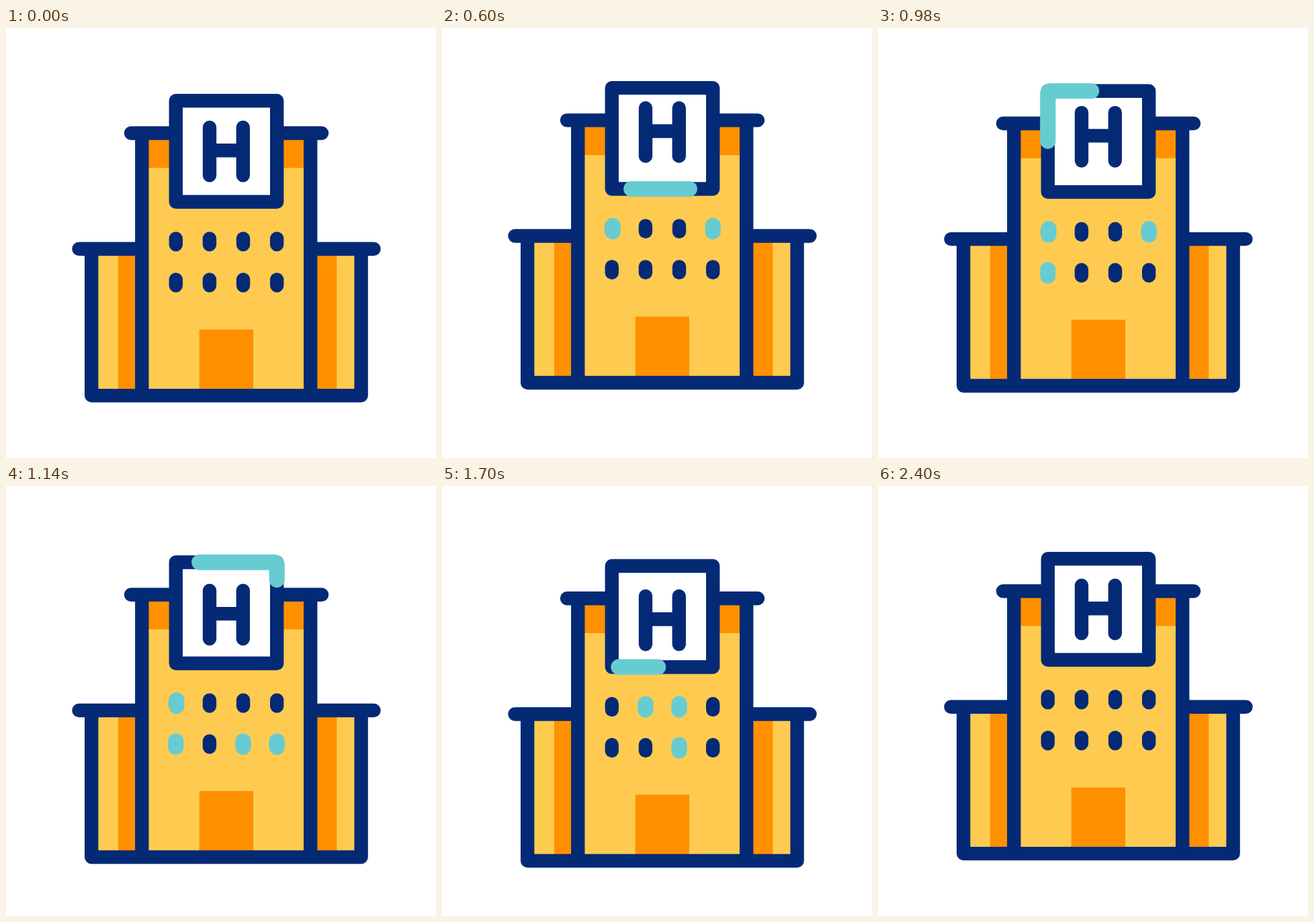
Write an HTML page that moves like this. It is 640x640 px and loops after 2620 ms.

```html
<!DOCTYPE html>
<html lang="en">
<head>
<meta charset="utf-8">
<title>Hospital</title>
<style>
  html, body { margin: 0; width: 100%; height: 100%; overflow: hidden; background: #fff; }
  svg { display: block; width: 100vw; height: 100vh; }
  .line { fill: none; stroke: #042a76; stroke-width: 20.4; stroke-linecap: round; stroke-linejoin: round; }
  .lit { fill: none; stroke: #67ccd1; stroke-width: 23.2; stroke-linecap: round; stroke-linejoin: round; }
  .wall { fill: #fecb50; }
  .shade { fill: #ff9000; }
</style>
</head>
<body>
<svg viewBox="0 0 640 640">
  <g id="building">
    <path class="wall" d="M127 329H202V156H453V329H528V547H127Z"/>
    <path class="shade" d="M202 156H453V208.300H202ZM167 329H202V547H167ZM453 329H492.300V547H453ZM287.700 448.700H368V547H287.700Z"/>
    <path class="line" d="M108.500 328.700H202.300M453.200 328.700H547.500M127.200 328.700V547.100H528.600V328.700M202.300 547V156.500M453.200 547V156.500M186 156.500H470"/>
    <path class="line" style="fill:#fff" d="M252.800 108.300H403.200V258.700H252.800Z"/>
    <path id="glow" class="lit"/>
    <g id="windows"></g>
  </g>
  <path id="letter" class="line" d="M303 147.900V219.400M352.800 147.900V219.400M303 182.200H352.800"/>
</svg>
<script>
const LOOP = 2620, SWING = 25.8, TRAVEL = 738;
const $ = id => document.getElementById(id);
const clamp = x => Math.min(1, Math.max(0, x));
const smooth = x => x * x * (3 - 2 * x);
const phase = (t, start, length) => clamp((t - start) / length);

// Ease with a quick start: cubic-bezier(.167, 0, .667, 1)
function settle(x) {
  let lo = 0, hi = 1;
  for (let i = 0; i < 24; i++) {
    const s = (lo + hi) / 2, r = 1 - s;
    if (3 * r * r * s * 0.167 + 3 * r * s * s * 0.667 + s * s * s < x) lo = s;
    else hi = s;
  }
  return smooth(lo);
}

function sway(t) {
  if (t < 800) return -SWING * smooth(phase(t, 200, 600));
  if (t < 1400) return SWING * (2 * smooth(phase(t, 800, 600)) - 1);
  return SWING * (1 - settle(phase(t, 1400, 600)));
}

// Clockwise lap around the sign, starting at its bottom right
const lap = "H256.800a4 4 0 0 1 -4 -4V112.300a4 4 0 0 1 4 -4H399.200a4 4 0 0 1 4 4V254.700a4 4 0 0 1 -4 4";
$("glow").setAttribute("d", "M399.200 258.700" + lap + lap);

// column, row, switch on, switch off
const lights = [
  [0, 0, 600, 1200], [1, 0, 1200, 2400], [2, 0, 1600, 2200], [3, 0, 400, 1000],
  [0, 1, 800, 1600], [1, 1, 0, 0], [2, 1, 1000, 1800], [3, 1, 1000, 1600]
];

function addPane(x, y, kind) {
  const pane = document.createElementNS("http://www.w3.org/2000/svg", "path");
  pane.setAttribute("class", kind);
  pane.setAttribute("d", `M${x} ${y}v8.800`);
  $("windows").append(pane);
  return pane;
}

const panes = lights.map(([col, row, on, off]) => {
  const x = 252.8 + col * 50.13, y = 313.5 + row * 61;
  addPane(x, y, "line");
  const shift = col + row === 0 ? 1.2 : 0;
  return { on, off, el: addPane(x + shift, y, "lit") };
});

function draw(t) {
  const dy = sway(t);
  $("building").setAttribute("transform", `translate(0 ${dy})`);
  $("letter").setAttribute("transform", `translate(0 ${dy * 1.5})`);

  const head = TRAVEL * smooth(phase(t, 197, 1600));
  const tail = TRAVEL * smooth(phase(t, 405, 1590));
  const glow = $("glow");
  glow.style.display = head - tail > 0.1 ? "" : "none";
  glow.setAttribute("stroke-dasharray", `${Math.max(0.1, head - tail)} 4000`);
  glow.setAttribute("stroke-dashoffset", -tail);

  for (const { on, off, el } of panes) el.style.display = t >= on && t < off ? "" : "none";
}

const begin = performance.now();
function tick() {
  draw((performance.now() - begin) % LOOP);
  requestAnimationFrame(tick);
}
tick();
</script>
</body>
</html>
```
